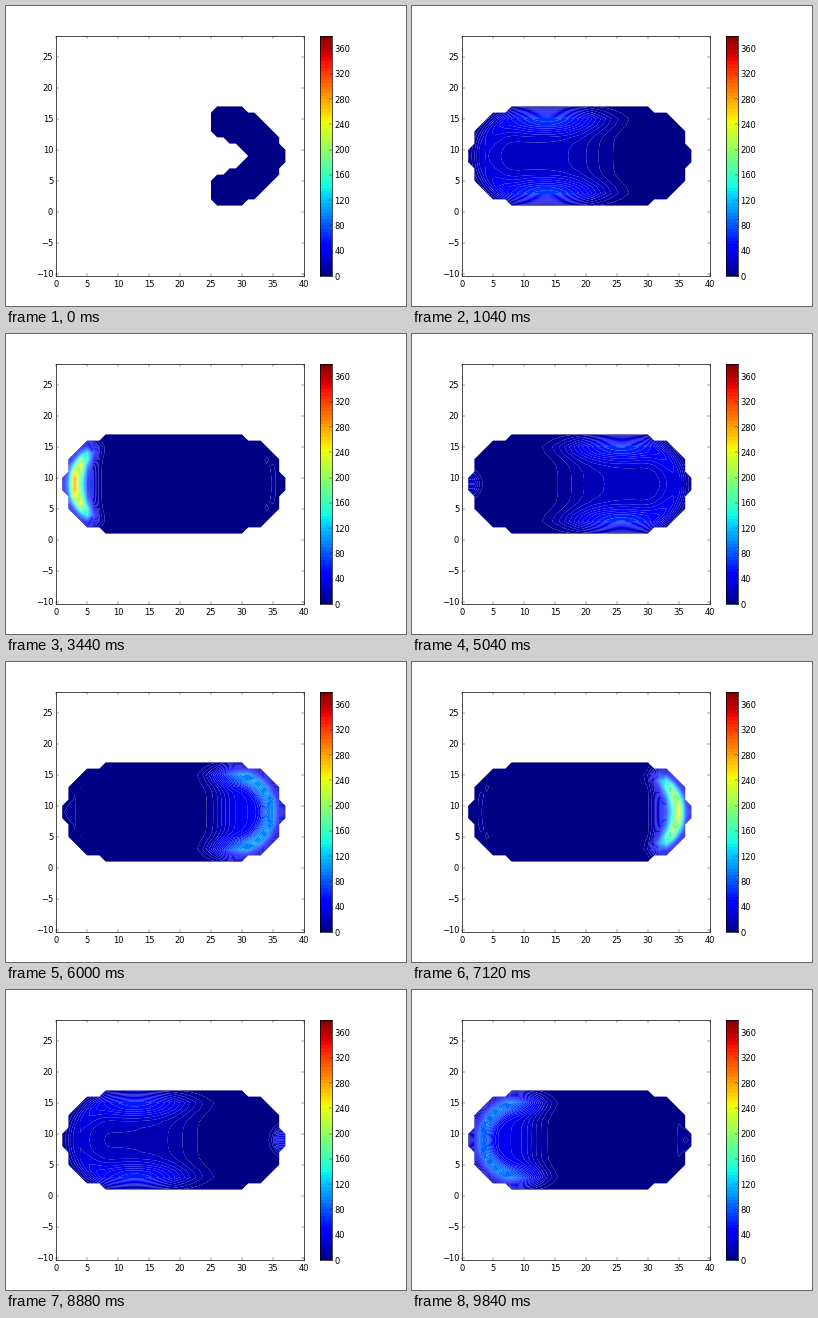
Write a matplotlib script that moves like this. It is 400 by 300 pixels and loops after 9.92 s.

```python
import numpy as np
import matplotlib.pyplot as plt
from matplotlib.animation import FuncAnimation
from matplotlib.transforms import Affine2D

plt.style.use("classic")
plt.rcParams.update({"savefig.dpi": "figure", "font.sans-serif": ["DejaVu Sans"]})

FRAMES, INTERVAL = 124, 80
CROSSING = 48.5                      # frames for one trip between the ends
TOP = 380
LEVELS = np.arange(0, TOP + 1, 5)

# A tank with round ends; DEPTH is the distance in from its wall
X, Y = np.meshgrid(np.arange(39), np.arange(19))
ROW = np.abs(Y - 9)
DEPTH = 8.2 - np.hypot(X - np.clip(X, 9.1, 28.9), ROW)
EDGE = np.clip((DEPTH + 0.4) / 2.4, 0, 1)
LAG = 3 * np.exp(-((ROW - 6) / 2) ** 2)


def step(v):
    return 1 / (1 + np.exp(-np.clip(v, -50, 50)))


def bump(v, centre, width):
    return np.exp(-((v - centre) / width) ** 2)


def field(n):
    trip, phase = divmod(n, CROSSING)
    s = phase / CROSSING
    ahead = X - 1 if trip % 2 == 0 else 37 - X     # distance to the far end
    behind = 36 - ahead

    # The band leaves one end, spreads out and packs against the other
    back = 40 * np.exp(-2.5 * s)
    front = 32 - 130 * s
    band = (step((back + LAG * (1 - s) - ahead) / (0.1 * back + 0.2))
            * step((ahead - front) / 2))

    # A crest follows the wall
    launch = 85 * np.exp(-s / 0.08)
    base = 12 + 110 * s ** 2 + launch
    crest = 40 + 240 * s ** 3 + launch
    ring = (bump(DEPTH, 2.2, 1 + 2.2 * (1 - s) ** 2)
            * bump(ahead, 34 * np.exp(-3.6 * s), 4 + 40 * s * (1 - s) ** 3))
    z = 0.92 ** trip * EDGE * band * (base + crest * ring)

    # What stays behind: a spot at the tip and a faint rim
    spot = 30 * trip * bump(phase, 14, 9)
    z = z + spot * bump(behind, 0.5, 1.2) * bump(Y, 9, 1.7)
    z = z + 7 * bump(DEPTH, 1.8, 0.9) * step(5 - behind) * step((phase - 20) / 4)
    return np.clip(z * min(1, n / 10), 0.5, TOP - 1)


def filled(n):
    start = np.maximum(np.maximum(25, 31 - 1.75 * ROW), 18 + ROW)
    return (DEPTH >= 0) & (X >= start - 3 * n) & (X + ROW <= 39 + 3 * n)


def lower_labels(axes):
    for label in axes.get_xticklabels() + axes.get_yticklabels():
        label.set_transform(label.get_transform() + Affine2D().translate(0, -1))


fig = plt.figure(figsize=(8, 6), dpi=50, facecolor="white")
ax = fig.add_axes([0.125, 0.1, 0.62, 0.8])
ax.set_xlim(0, 40)
ax.set_ylim(9 - 19.355, 9 + 19.355)
ax.set_xticks(range(0, 41, 5))
ax.set_yticks(range(-10, 26, 5))
lower_labels(ax)

bar = fig.add_axes([313.5 / 400, 0.1, 12 / 400, 0.8])
bar.imshow((LEVELS[:-1] + 2.5)[:, None], cmap="jet", vmin=0, vmax=TOP,
           origin="lower", extent=(0, 1, 0, TOP), aspect="auto",
           interpolation="nearest")
bar.set_xticks([])
bar.set_yticks(range(0, 361, 40))
bar.yaxis.tick_right()
lower_labels(bar)


def draw(n):
    for old in list(ax.collections):
        old.remove()
    z = np.ma.array(field(n), mask=~filled(n))
    ax.contourf(X, Y, z, LEVELS, cmap="jet", vmin=0, vmax=TOP,
                antialiased=True, corner_mask=True)
    return ax.collections


anim = FuncAnimation(fig, draw, frames=FRAMES, interval=INTERVAL,
                     repeat=True, repeat_delay=0, blit=False)
plt.show()
```
